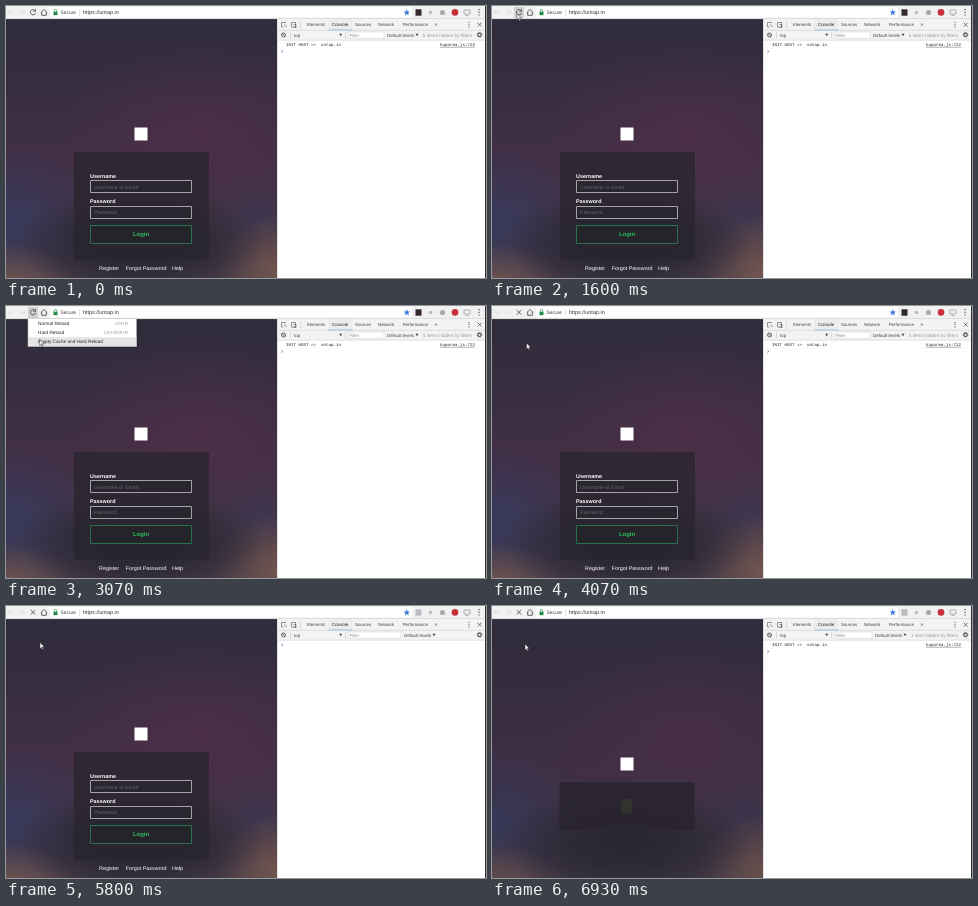
Recreate the animation shown at these times as an HTML page. Size 480 by 272 pixels, loop 7070 ms.

```html
<!DOCTYPE html>
<html lang="en">
<head>
<meta charset="utf-8">
<title>Hard reload</title>
<style>
html, body { margin: 0; width: 100%; height: 100%; overflow: hidden; background: #fff; }
svg { display: block; width: 480px; height: 272px; }
text { font: 4.4px "Liberation Sans", Arial, sans-serif; fill: #444; white-space: pre; text-rendering: geometricPrecision; }
.mono { font: 4.17px "Liberation Mono", "DejaVu Sans Mono", monospace; fill: #222; }
.label { font-size: 5.4px; font-weight: bold; fill: #fff; }
.hint { font-size: 5.15px; fill: #68646f; }
.link { font-size: 5.4px; fill: #fff; }
.menu { font-size: 4.7px; fill: #222; }
.key { font-size: 4.5px; fill: #999; text-anchor: end; }
.line { fill: none; stroke: #555; stroke-width: .9; }
</style>
</head>
<body>
<svg viewBox="0 0 480 272">
  <defs>
    <linearGradient id="sky" x2="0" y2="1">
      <stop offset="0" stop-color="#2f2c3b"/>
      <stop offset=".25" stop-color="#372d40"/>
      <stop offset=".55" stop-color="#422f46"/>
      <stop offset="1" stop-color="#443a47"/>
    </linearGradient>
    <radialGradient id="rose"><stop stop-color="#54304a" stop-opacity=".6"/><stop offset="1" stop-color="#54304a" stop-opacity="0"/></radialGradient>
    <radialGradient id="blue"><stop stop-color="#353a61" stop-opacity=".8"/><stop offset="1" stop-color="#353a61" stop-opacity="0"/></radialGradient>
    <radialGradient id="tan"><stop stop-color="#7d5d52" stop-opacity=".85"/><stop offset="1" stop-color="#7d5d52" stop-opacity="0"/></radialGradient>
    <radialGradient id="shade"><stop stop-color="#272631"/><stop offset=".5" stop-color="#292733" stop-opacity=".8"/><stop offset="1" stop-color="#2b2835" stop-opacity="0"/></radialGradient>
    <clipPath id="view"><path d="M0 13H271V272H0z"/></clipPath>
  </defs>

  <!-- page -->
  <g clip-path="url(#view)">
    <path d="M0 13H271V272H0z" fill="#302d3b"/>
    <g id="backdrop">
      <path d="M0 13H271V272H0z" fill="url(#sky)"/>
      <ellipse cx="195" cy="125" rx="140" ry="90" fill="url(#rose)"/>
      <ellipse cx="5" cy="215" rx="90" ry="75" fill="url(#blue)"/>
      <ellipse cx="255" cy="210" rx="50" ry="35" fill="url(#blue)" opacity=".4"/>
      <ellipse cx="5" cy="282" rx="70" ry="45" fill="url(#tan)"/>
      <ellipse cx="275" cy="268" rx="70" ry="60" fill="url(#tan)"/>
      <ellipse cx="135" cy="236" rx="125" ry="56" fill="url(#shade)"/>
    </g>
    <rect id="logo" x="128.5" width="13" height="13" fill="#fff"/>
    <g id="login">
      <path d="M68 146H203V254H68z" fill="#29242e" fill-opacity=".75"/>
      <text class="label" x="84" y="171.5">Username</text>
      <text class="label" x="84" y="197.3">Password</text>
      <g fill="#29262f" stroke="#b3b1b8" stroke-width=".9">
        <path d="M84.5 174.5h101v12h-101z"/>
        <path d="M84.5 200.5h101v12h-101z"/>
        <path d="M84.5 219.5h101v18h-101z" fill="#25242b" stroke="#2b7a52"/>
      </g>
      <text class="hint" x="88" y="182.7">Username or Email</text>
      <text class="hint" x="88" y="208.4">Password</text>
      <text class="label" x="135" y="230.3" text-anchor="middle" style="font-size:5.9px;fill:#2fbf62">Login</text>
      <text class="link" x="93" y="263.7">Register</text>
      <text class="link" x="119.7" y="263.7">Forgot Password</text>
      <text class="link" x="166" y="263.7">Help</text>
    </g>
    <g id="loader">
      <path d="M67.5 176H202.5V224H67.5z" fill="#28242f" fill-opacity=".85"/>
      <path d="M129 193h11v14h-11z" fill="#30332e"/>
    </g>
  </g>

  <!-- browser bar -->
  <path d="M0 0H480V13H0z" fill="#f1f1f1"/>
  <path d="M44 1H406V11.5H44z" fill="#fff"/>
  <path d="M0 12.7H480" stroke="#c8c8c8" stroke-width=".6"/>
  <path class="line" style="stroke:#ddd" d="M8 6.3H2.5M5 3.8 2.5 6.3 5 8.8M13.5 6.3H19M16.5 3.8 19 6.3 16.5 8.8"/>
  <rect id="press" x="22" y="1" width="10" height="11" fill="#d0d0d0"/>
  <path id="reload" class="line" d="M29 4.6A2.6 2.6 0 1 0 29.5 7M29.5 3.2V5.3H27.4"/>
  <path id="stop" class="line" d="M24.7 4 29.3 8.6M29.3 4 24.7 8.6"/>
  <path class="line" d="M34.8 6.6 38 3.5 41.2 6.6M35.7 6V9.3H40.3V6"/>
  <path d="M47.5 5.8h4v3.4h-4z" fill="#218a48"/>
  <path class="line" style="stroke:#218a48;stroke-width:.7" d="M48.3 6V4.6a1.2 1.2 0 0 1 2.4 0V6"/>
  <text x="54.6" y="8.2" style="font-size:4.9px">Secure</text>
  <path d="M73.5 3.5V9.5" stroke="#ccc" stroke-width=".6"/>
  <text x="77" y="8.2" style="font-size:5.45px;fill:#333">https://untap.in</text>
  <path d="M400.8 3.1l.9 2.3 2.4.1-1.9 1.5.7 2.4-2.1-1.4-2.1 1.4.7-2.4-1.9-1.5 2.4-.1z" fill="#3d7be0"/>
  <rect id="ext" x="409.5" y="3.3" width="6" height="6.4"/>
  <circle cx="424.5" cy="6.5" r="1.7" fill="#bbb"/>
  <circle cx="436.5" cy="6.5" r="2.6" fill="#aaa"/>
  <circle cx="449" cy="6.4" r="3.3" fill="#c92f3a"/>
  <path class="line" style="stroke:#aaa" d="M458 4h6v4h-6zM459.5 9.5h3"/>
  <path d="M472.5 3h1.2v1.2h-1.2zm0 2.7h1.2v1.2h-1.2zm0 2.7h1.2v1.2h-1.2z" fill="#555"/>

  <!-- developer tools -->
  <path d="M271 13H480V272H271z" fill="#fff"/>
  <path d="M271.5 13H480V34H271.5z" fill="#f3f3f3"/>
  <path d="M322 13H346.5V24H322z" fill="#ececec"/>
  <path d="M271.5 13V272M271.5 24.3H480M271.5 34.2H480" fill="none" stroke="#cfcfcf" stroke-width=".6"/>
  <path d="M322 24H346.5" stroke="#8fb2ec" stroke-width=".7"/>
  <path class="line" style="stroke-width:.6" d="M280 16.5h-4.5v4.5h2M278 18.5l3 2.5M285.5 16.5h4v4.5h-4zM287.5 18.5h2.5v3h-2.5"/>
  <path d="M294.5 15.5V22.5" stroke="#ccc" stroke-width=".6"/>
  <text x="301" y="20.4">Elements</text>
  <text x="326" y="20.4" style="fill:#222">Console</text>
  <text x="349" y="20.4">Sources</text>
  <text x="372" y="20.4">Network</text>
  <text x="396.7" y="20.4">Performance</text>
  <text x="428.3" y="20.3" style="font-size:5.5px">»</text>
  <path d="M462.4 16h1.1v1.1h-1.1zm0 2.2h1.1v1.1h-1.1zm0 2.2h1.1v1.1h-1.1z" fill="#555"/>
  <path class="line" style="stroke-width:.8" d="M471.7 16.7l3.8 3.8m0-3.8l-3.8 3.8"/>
  <circle class="line" cx="277.5" cy="29" r="2"/>
  <path class="line" d="M276.1 27.6l2.8 2.8"/>
  <path d="M284.5 26V32.5" stroke="#ccc" stroke-width=".6"/>
  <text x="288" y="30.6">top</text>
  <path d="M333.2 27.8h3l-1.5 2.4z" fill="#444"/>
  <path d="M339.5 26V32.5" stroke="#ccc" stroke-width=".6"/>
  <rect id="filter" x="342" y="26" height="6.6" fill="#fff" stroke="#cfcfcf" stroke-width=".5"/>
  <text x="343.5" y="30.7" style="fill:#888">Filter</text>
  <g id="levels">
    <text y="30.6" style="font-size:4.5px">Default levels</text>
    <path d="M28.5 27.8h3l-1.5 2.4z" fill="#444"/>
  </g>
  <text id="hidden" x="466" y="30.6" text-anchor="end" style="font-size:4.7px;fill:#999"></text>
  <circle class="line" cx="473.5" cy="28.8" r="1.7" style="stroke-width:1.1"/>
  <circle class="line" cx="473.5" cy="28.8" r="2.4" stroke-dasharray=".9 .98" style="stroke-width:.8"/>
  <g id="log">
    <text class="mono" x="280" y="39.9">INIT HOST =&gt;  untap.in</text>
    <text class="mono" x="434" y="39.9" text-decoration="underline">kuporea.js:722</text>
    <path d="M272 42H480" stroke="#f2f2f2" stroke-width=".5"/>
  </g>
  <path id="prompt" class="line" style="stroke:#4474bd" d="M275.5-1.2l1.3 1.2-1.3 1.2"/>

  <!-- reload menu -->
  <g id="menu">
    <path d="M22.5 13H131.5V41.5H22.5z" fill="#000" fill-opacity=".25"/>
    <path d="M22 12.5H130.5V40.5H22z" fill="#fff" stroke="#bbb" stroke-width=".5"/>
    <rect id="hover" x="22.3" width="108" height="9" fill="#e4e4e4"/>
    <text class="menu" x="32" y="18.8">Normal Reload</text>
    <text class="menu" x="32" y="27.9">Hard Reload</text>
    <text class="menu" x="32" y="37">Empty Cache and Hard Reload</text>
    <text class="key" x="122" y="18.8">Ctrl+R</text>
    <text class="key" x="122" y="27.9">Ctrl+Shift+R</text>
  </g>

  <path d="M479.5 0V272" stroke="#333"/>
  <path id="cursor" d="M0 0V6.2L1.4 4.9 2.4 7.1 3.4 6.6 2.4 4.5H4.3z" fill="#fff" stroke="#222" stroke-width=".5"/>
</svg>
<script>
const LOOP = 7070;
const OPEN = 1800, PICK = 3600, CLEAR = 5200, BLANK = 6070, LOGGED = 6270, FADE = 6530;
const path = [ // time, x, y
  [0, 60, -12], [530, 60, -10], [800, 51.5, -1], [1330, 25, 7.5], [2530, 25, 8],
  [3130, 34, 34], [3600, 35, 36.5], [4070, 34.5, 37], [5800, 34, 36.5], [6530, 34, 37], [6930, 33, 38]
];
const $ = id => document.getElementById(id);
const set = (id, name, value) => $(id).setAttribute(name, value);
const show = (id, on) => set(id, "visibility", on ? "visible" : "hidden");
const clamp = v => Math.max(0, Math.min(1, v));

function cursorAt(t) {
  const i = path.findIndex(p => p[0] > t);
  if (i < 0) return path[path.length - 1].slice(1);
  const a = path[i - 1], b = path[i];
  const k = (t - a[0]) / (b[0] - a[0]), e = k * k * (3 - 2 * k);
  return [1, 2].map(j => a[j] + (b[j] - a[j]) * e);
}

function draw(t) {
  const [x, y] = cursorAt(t);
  const open = t >= OPEN && t < PICK;
  const loading = t >= PICK, blank = t >= BLANK;
  const cleared = t >= CLEAR, logged = !cleared || t >= LOGGED;

  set("cursor", "transform", `translate(${x} ${y})`);
  show("press", t >= 1270 && t < PICK);
  show("reload", !loading);
  show("stop", loading);

  show("menu", open);
  show("hover", open && y > 12);
  const row = Math.max(0, Math.min(2, Math.floor((y - 12.5) / 9.2)));
  set("hover", "y", 12.8 + row * 9.2);

  const fade = clamp((t - FADE) / 400);
  set("backdrop", "opacity", blank ? fade * .85 : 1);
  show("login", !blank);
  show("loader", blank);
  set("logo", "y", blank ? 151.5 : 121.5);
  set("logo", "opacity", blank ? clamp((t - FADE) / 200) : 1);

  show("log", logged);
  set("prompt", "transform", `translate(0 ${logged ? 45.5 : 39})`);
  $("hidden").textContent = !cleared ? "5 items hidden by filters" : logged ? "1 item hidden by filters" : "";
  const left = !logged ? 398 : cleared ? 383 : 381;
  set("levels", "transform", `translate(${left} 0)`);
  set("filter", "width", left - 345);
  set("ext", "fill", cleared ? "#b9bdc2" : "#33292b");
}

const start = performance.now();
function tick() {
  draw((performance.now() - start) % LOOP);
  requestAnimationFrame(tick);
}
tick();
</script>
</body>
</html>
```
